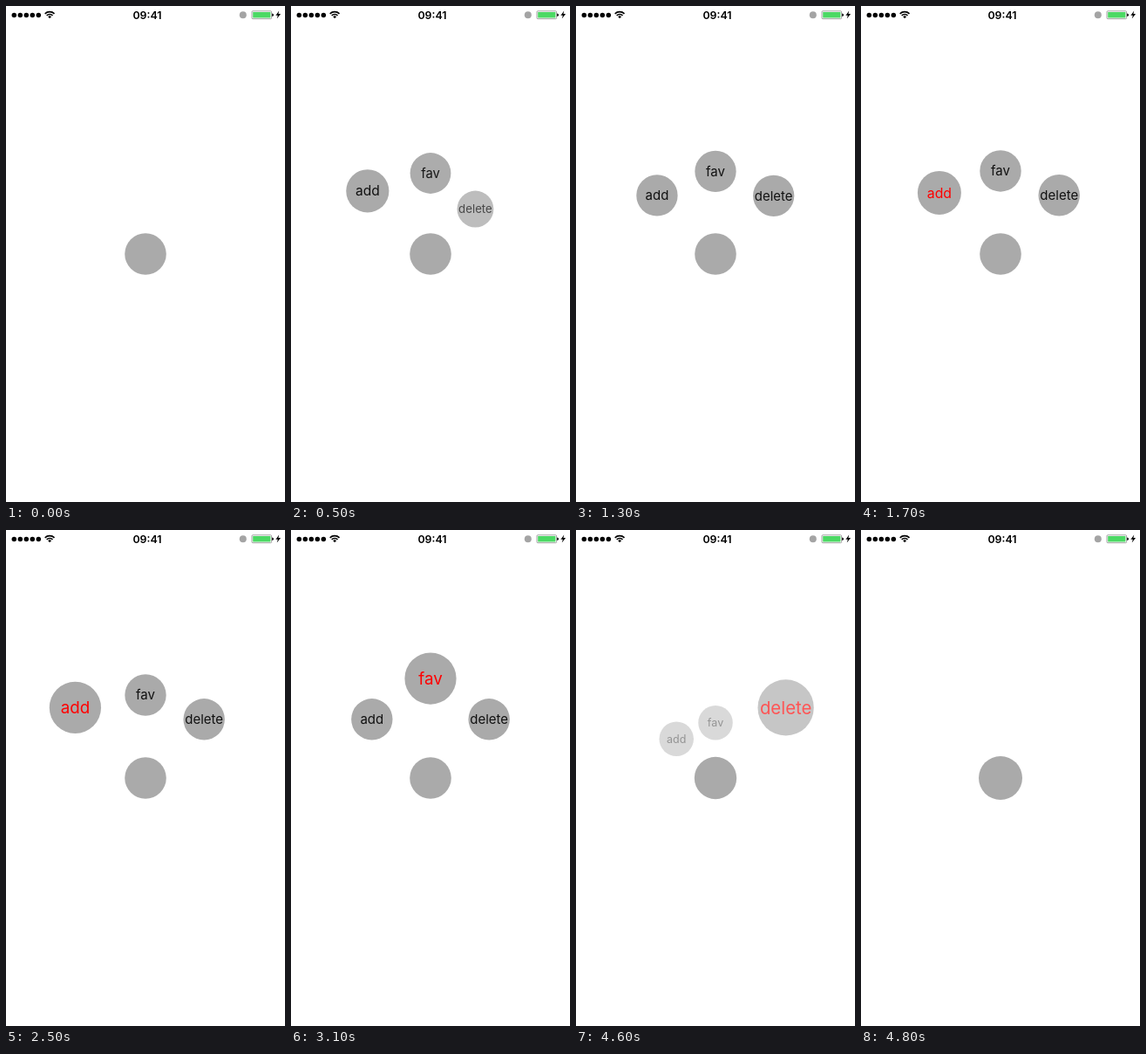
Recreate the animation shown at these times as an HTML page. Size 320 px wide and 568 px high, loop 6000 ms.

```html
<!DOCTYPE html>
<html lang="en">
<head>
<meta charset="utf-8">
<title>Radial menu</title>
<style>
html, body { margin: 0; width: 100%; height: 100%; overflow: hidden; background: #fff; }
svg { display: block; width: 100vw; height: 100vh; }
text { font-family: Inter, Roboto, sans-serif; text-anchor: middle; }
</style>
</head>
<body>
<svg id="stage" viewBox="0 0 320 568">
  <rect width="320" height="568" fill="#fff"/>
  <g id="signal"></g>
  <g fill="none" stroke="#000" stroke-width="1.6">
    <path d="M44.7 8.9A7.6 7.6 0 0 1 55.5 8.9"/>
    <path d="M46.7 10.9A4.8 4.8 0 0 1 53.5 10.9"/>
  </g>
  <path d="M50.1 14.2L48.2 12.3A2.7 2.7 0 0 1 52 12.3Z"/>
  <text x="162" y="14.6" font-size="12.4" font-weight="600">09:41</text>
  <circle cx="271.8" cy="10.3" r="4" fill="#a4a4a4"/>
  <rect x="282" y="5.8" width="22.6" height="8.9" rx="1" fill="#fff" stroke="#a0a0a0"/>
  <rect x="283.2" y="7" width="20.2" height="6.5" fill="#4cd964"/>
  <path d="M305.2 8.6A1.7 1.7 0 0 1 305.2 12Z"/>
  <path d="M313.2 5.4L309.4 10.7H311.8L310.8 14.6L315 9.1H312.4Z"/>
  <g id="items"></g>
  <circle id="hub" cx="160" cy="284" fill="#aaa"/>
</svg>
<script>
const LOOP = 6000, STEP = 100;
const CX = 160, CY = 284, R = 23.7, DIST = 95;
const CLOSE = 4500, CLOSED = 4800, FADE = 200;
const NS = 'http://www.w3.org/2000/svg';
const $ = id => document.getElementById(id);

function add(parent, tag, attrs) {
  const el = document.createElementNS(NS, tag);
  for (const k in attrs) el.setAttribute(k, attrs[k]);
  return parent.appendChild(el);
}

for (let i = 0; i < 5; i++) {
  add($('signal'), 'circle', { cx: 9.3 + i * 7, cy: 10.4, r: 2.75 });
}

// on/off: the time span in which an item is selected
const items = [
  { label: 'add', angle: -135, delay: 95, on: 1640, off: 2900 },
  { label: 'fav', angle: -90, delay: 180, on: 2900, off: 3750 },
  { label: 'delete', angle: -45, delay: 263, on: 3750, off: LOOP }
];
for (const it of items) {
  it.g = add($('items'), 'g', {});
  add(it.g, 'circle', { r: R, fill: '#aaa' });
  it.text = add(it.g, 'text', { y: 5.4, 'font-size': 15 });
  it.text.textContent = it.label;
}

const clamp = x => Math.min(1, Math.max(0, x));
const ease = x => (x = clamp(x), x * x * (3 - 2 * x));

// Underdamped spring, damping ratio 0.6
function spring(ms) {
  if (ms <= 0) return 0;
  const x = ms * 0.0066;
  return 1 - Math.exp(-0.75 * x) * (Math.cos(x) + 0.75 * Math.sin(x));
}

function draw(t) {
  const close = clamp((t - CLOSE) / (CLOSED - CLOSE));
  for (const it of items) {
    const selected = t >= it.on && t < it.off;
    const lift = ease((t - it.on) / FADE) - ease((t - it.off) / FADE);
    const leaving = selected ? 0 : close;
    const open = spring(t - it.delay) * (1 - leaving);
    const dist = DIST * (open + 0.2 * lift);
    const scale = 0.5 + 0.5 * open + lift * (0.25 + 0.32 * close);
    const a = it.angle * Math.PI / 180;
    const x = CX + dist * Math.cos(a), y = CY + dist * Math.sin(a);
    it.g.setAttribute('transform', `translate(${x} ${y}) scale(${scale})`);
    it.g.setAttribute('opacity', clamp(open) * (1 - close));
    it.text.setAttribute('fill', selected ? '#f00' : '#111');
  }
  $('hub').setAttribute('r', 23.8 + 1.2 * close);
}

const start = performance.now();
function tick() {
  const t = (performance.now() - start) % LOOP;
  draw(Math.floor(t / STEP) * STEP);
  requestAnimationFrame(tick);
}
tick();
</script>
</body>
</html>
```
